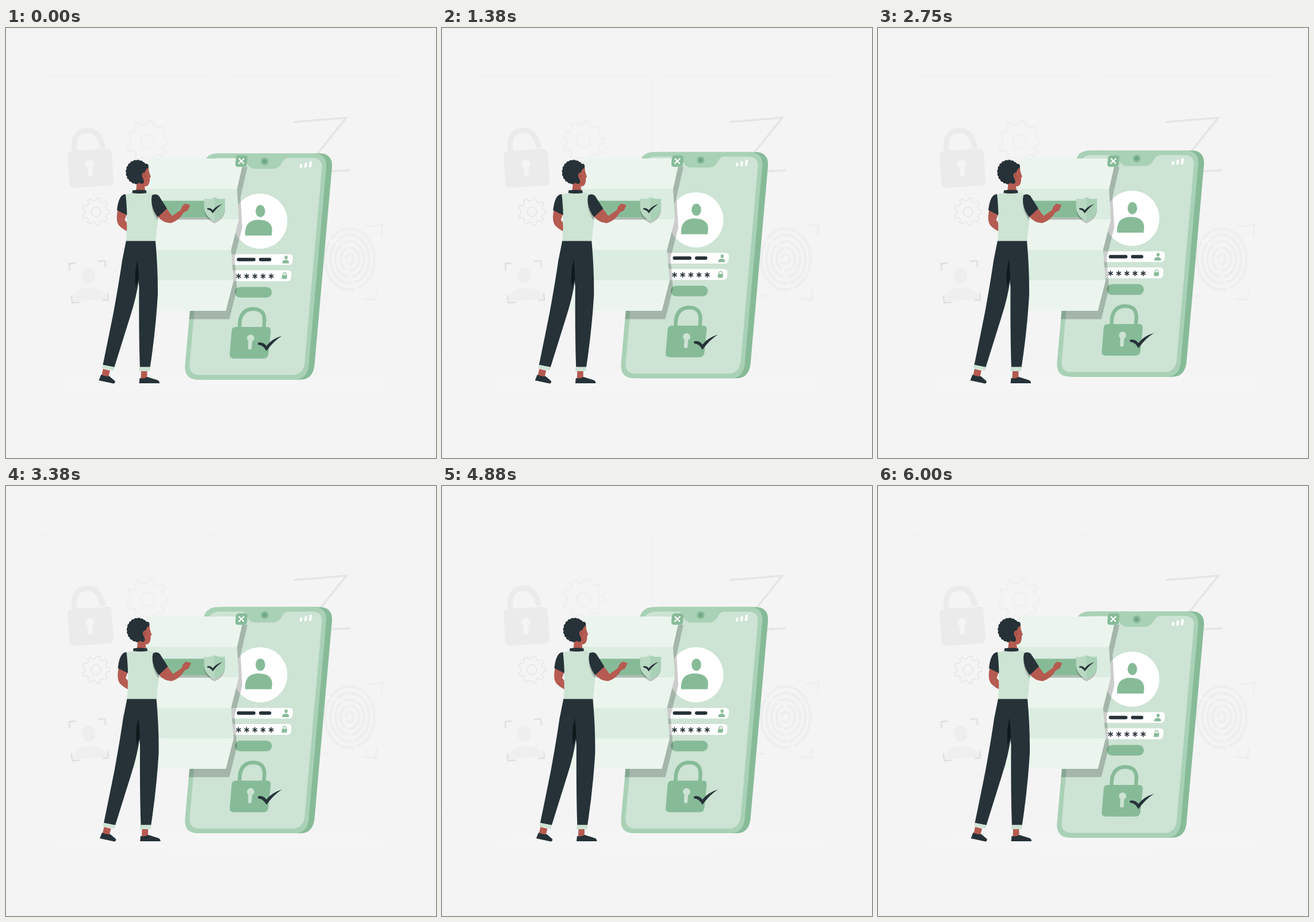
Write an HTML page that moves like this. It is 748 px wide and 748 px high and loops after 6.04 s.

```html
<!DOCTYPE html>
<html lang="en">
<head>
<meta charset="utf-8">
<title>Secure login</title>
<style>
  html, body { margin: 0; width: 100%; height: 100%; overflow: hidden; background: #f4f4f4; }
  svg { display: block; width: 100%; height: 100%; }
  .mid { fill: #87bb98; }
  .body { fill: #a9d1b6; }
  .pale { fill: #cde3d4; }
  .dark { fill: #263238; }
  .skin { fill: #b55b51; }
  .white { fill: #fff; }
  .shade { fill: #000; opacity: .2; }
  .line { fill: none; stroke-linecap: round; stroke-linejoin: round; }
</style>
</head>
<body>
<svg viewBox="0 0 748 748">
  <defs>
    <path id="front" d="M368 218H534Q559 218 557 243L526.500 588Q523 611.700 502 611.700H334Q309.500 611.700 311.500 586L342 244Q345 218 368 218Z"/>
    <path id="shield" d="M344.500 297Q355 298.500 362.700 294.500Q370 298.500 381 297V313Q380 328 362.700 336Q346 328 344.500 313Z"/>
    <path id="tick" d="M438 547.500Q447 545 453 553Q462 541 480 535.500Q465 545 453 562Q447 551 438.500 551Z"/>
    <clipPath id="onPhone"><use href="#front"/></clipPath>
    <clipPath id="rightHalf"><rect x="362.700" y="290" width="22" height="50"/></clipPath>
  </defs>

  <g id="backdrop">
    <g fill="none" stroke="#f0f0f0">
      <rect x="60" y="84" width="305" height="421"/>
      <rect x="383" y="84" width="306" height="421"/>
      <path d="M0 572H748" stroke="#f2f2f2"/>
    </g>
    <ellipse cx="375" cy="619" rx="290" ry="17" fill="#f5f5f5"/>
    <path class="line" d="M119 213Q115 178 142 178Q160 177 168 205" stroke="#ebebeb" stroke-width="9.500"/>
    <rect x="108.500" y="212" width="77" height="64" rx="8" fill="#ebebeb" transform="rotate(-3.700 147 244)"/>
    <path class="line" d="M146 239L146.500 255" stroke="#f4f4f4" stroke-width="8"/>
    <circle cx="146" cy="237" r="7.800" fill="#f4f4f4"/>
    <g id="gears" fill="none"></g>
    <path d="M111 422L110 410L121 409M160 406L172 405L173 416M114 465L115 478L128 477M167 474L178 473L177 461" fill="none" stroke="#dfdfdf" stroke-width="2.500"/>
    <ellipse cx="143.500" cy="431" rx="11.500" ry="14" fill="#eee"/>
    <path d="M116 475Q117 453 144 452Q174 452 176 472Z" fill="#efefef"/>
    <path d="M501 163.500L592 156L515 252L598 247.500" fill="none" stroke="#e5e5e5" stroke-width="3.500"/>
    <g id="fingerprint" class="line" stroke="#eee" stroke-width="4.500"></g>
    <path d="M633 345L655 342L653 362M621 471L643 473L645 455M552 466H562" fill="none" stroke="#eee" stroke-width="3"/>
  </g>

  <g id="phone">
    <use href="#front" x="10" class="mid"/>
    <path class="mid" d="M500 218H545V612H500Z" clip-path="url(#onPhone)"/>
    <use href="#front" class="body"/>
    <path class="pale" d="M372 226H412Q418 228 420 236Q424 245 434 245H463Q474 245 479 236Q484 226 490 226H532Q551 226 549.500 244L519.500 583Q517 603.500 498 603.500H336Q318 603.500 319.500 584L350 246Q352 226 372 226Z"/>
    <circle class="mid" cx="450" cy="232" r="6.700"/>
    <circle cx="450" cy="232" r="3.500" fill="#72a585"/>
    <rect class="white" x="364" y="236.500" width="14" height="5" opacity=".8"/>
    <g class="line" stroke="#fff" stroke-width="4.200">
      <path d="M513 241.500L513.500 238.500M521 241L521.700 236M529 240.500L530 233.500"/>
    </g>
    <ellipse class="white" cx="442" cy="336" rx="47.500" ry="48"/>
    <g class="mid">
      <ellipse cx="442.500" cy="318.500" rx="8.300" ry="10.700"/>
      <path d="M416 361Q414 334 439 333.500Q463 334 463 352L462 361Z"/>
    </g>
    <path class="white" d="M380 393.500H493Q499.500 393.500 499 400L498.500 406Q498 412 492 412H380Z"/>
    <path class="white" d="M380 421.500H490.500Q497 421.500 496.500 428L496 434Q495.500 440.500 489 440.500H380Z"/>
    <rect class="dark" x="401.500" y="399.700" width="32.500" height="6" rx="3"/>
    <rect class="dark" x="440" y="399.700" width="21.500" height="6" rx="3"/>
    <g class="mid">
      <ellipse cx="487.200" cy="399.300" rx="2.600" ry="3.200"/>
      <path d="M480.500 409.500Q480 403.500 486.500 403.500Q493 403.500 492.300 409.500Z"/>
      <path d="M480.500 430H489L488.300 436.500H479.500Z"/>
      <path class="line" d="M481.800 430.500Q481.500 425.500 484.700 425.500Q488 425.500 487.500 430.500" stroke="#87bb98" stroke-width="1.300" style="fill:none"/>
      <rect x="398" y="450.500" width="64.500" height="18.600" rx="9.300"/>
    </g>
    <g id="stars" class="line" stroke="#263238" stroke-width="1.700"></g>
    <path d="M406 523L407 509Q411 488.700 430 488.700Q450 488.700 449.500 509L448.500 523" fill="none" stroke="#87bb98" stroke-width="6.500"/>
    <path class="mid" d="M400 520H454Q461 520 460.500 527L456.500 567Q455.500 575 447.500 575H397Q388.700 575 389.200 568L392.500 527Q393 520 400 520Z"/>
    <circle class="pale" cx="425.500" cy="539.500" r="6.300"/>
    <path class="line" d="M425 541L424.200 556" stroke="#cde3d4" stroke-width="6.500"/>
    <use href="#tick" class="dark"/>
    <g clip-path="url(#onPhone)">
      <path id="paperShade" class="shade" d="M300 241.500H420L408 294L411 347L397.500 400L402 453L388.500 506.500H300Z"/>
    </g>
  </g>

  <g id="paper"></g>
  <rect class="shade" x="267" y="305" width="90" height="28.500" rx="4"/>
  <rect class="mid" x="267" y="300.500" width="90" height="28.500" rx="4"/>
  <use href="#shield" class="shade" y="4"/>
  <use href="#shield" fill="#b9d9c3"/>
  <use href="#shield" class="body" clip-path="url(#rightHalf)"/>
  <use href="#tick" class="dark" transform="translate(350 313.500) scale(.64 .62) translate(-438 -547.500)"/>
  <path class="mid" d="M405.500 221.500H415Q420.500 221.500 420 227L419.300 236Q418.800 241.500 413.500 241.500H404Q398.600 241.500 399 236L399.800 227Q400.200 221.500 405.500 221.500Z"/>
  <path class="line" d="M405.500 227.500L413.200 235.500M413.700 227.500L405 235.500" stroke="#fff" stroke-width="2.300"/>

  <g id="person">
    <path class="skin" d="M169 593L181 596L178 608L166 606ZM235 596H245.500V611H234.500Z"/>
    <path class="dark" d="M165.500 603Q174 607 179.500 605.500L189.500 614Q190.500 618 187 618.500L161.500 613ZM232.500 609Q240 610.500 246 607L262 612Q267.500 613.500 267 618H231.700Z"/>
    <path class="dark" d="M209 370H240L231 438Q227 468 216 502L188.500 590L168.500 586Q177 545 187 495Q197 440 202 405Z"/>
    <path class="dark" d="M222 370H260Q264.500 420 264 465Q260 530 250.500 591H233Q231 540 231.500 450Z"/>
    <path d="M229 403Q222.500 425 225.500 452Q228 442 231.300 437Z" fill="#10181b"/>
    <path class="pale" d="M168.500 586L188.500 590L187 596L167 592ZM232 589.500H251L250 597H231.500Z"/>
    <path class="skin" d="M194.500 316Q190 336 197 344Q203 350 212 354.500L210 338L206.500 334L210 324Z"/>
    <path class="skin" d="M236 238L248 242Q248.500 251 250 254L252 258.500L250 261Q250.500 272 245 275Q242 276 241 275L242.500 285H226L228 266Z"/>
    <path class="pale" d="M206 290Q222 285 232 287Q247 285 257 288L264.500 331Q262 350 260.500 370.500H209Q211.500 345 209.500 320Z"/>
    <path class="dark" d="M220 282.500Q232 280.500 244 282.500L244.500 287Q232 289 219.500 287ZM208 289Q196 289 193 317L210.500 325.500Q210 305 208 289Z"/>
    <path class="shade" d="M253.500 299Q251 316 263 334L266 329Z"/>
    <path class="skin" d="M263 326Q274 341 288 339Q302 334 309 321L316 317.500L320.500 308Q316 306.500 312 305.500Q306 308 304 316.500L289 327L278 312Z"/>
    <path class="dark" d="M254 291Q261 287 266 292L280 314L264 329Q253 315 253 298Z"/>
    <g id="hair" class="dark">
      <path d="M213 244Q220 233 240 233L245 244Q242 249 240 254L238 268Q230 272 221 267Q210 257 213 244Z"/>
    </g>
    <ellipse class="skin" cx="240.300" cy="257" rx="3.700" ry="5.500" transform="rotate(-8 240 257)"/>
    <path class="line" d="M239 254.500Q242 255.500 241 259.500M248 253L249.500 252.500" stroke="#7c3b36" stroke-width=".8"/>
  </g>
</svg>

<script>
const LOOP = 6040, UNIT = 748 / 500;
const byId = id => document.getElementById(id);

function add(parent, tag, attrs) {
  const el = document.createElementNS('http://www.w3.org/2000/svg', tag);
  for (const key in attrs) el.setAttribute(key, attrs[key]);
  byId(parent).appendChild(el);
}

function gear(cx, cy, outer, hub, color, width) {
  const teeth = 9, points = [];
  for (let i = 0; i < teeth; i++) {
    for (const [turn, size] of [[-.3, .8], [-.18, 1], [.18, 1], [.3, .8]]) {
      const a = (i + turn) / teeth * 2 * Math.PI;
      points.push([cx + outer * size * Math.cos(a), cy + outer * size * Math.sin(a)]);
    }
  }
  const style = { stroke: color, 'stroke-width': width, 'stroke-linejoin': 'round' };
  add('gears', 'path', { d: 'M' + points.join('L') + 'Z', ...style });
  add('gears', 'circle', { cx, cy, r: hub, ...style });
}
gear(246, 197, 36, 12, '#eee', 2);
gear(156.5, 319.5, 24, 8.5, '#e6e6e6', 1.6);

for (let i = 0; i < 5; i++) {
  const rx = 7 + i * 9, ry = 9 + i * 11;
  add('fingerprint', 'ellipse', {
    cx: 598, cy: 402, rx, ry, 'stroke-dasharray': `${rx * 2.6} 9`, 'stroke-dashoffset': i * 13
  });
}

for (let i = 0; i < 5; i++) {
  const x = 404.5 + i * 14.2, y = 431.8;
  for (let k = 0; k < 3; k++) {
    const a = k * Math.PI / 3 + .5, dx = 4 * Math.cos(a), dy = 4 * Math.sin(a);
    add('stars', 'path', { d: `M${x - dx} ${y - dy}L${x + dx} ${y + dy}` });
  }
}

// Folded paper: five bands between zigzag edges
const edge = [414, 402, 405, 391.5, 396, 382.5], paperWidth = 167;
for (let i = 0; i < 5; i++) {
  const top = 227 + i * 53, bottom = top + 53, a = edge[i], b = edge[i + 1];
  add('paper', 'path', {
    d: `M${a - paperWidth} ${top}H${a}L${b} ${bottom}H${b - paperWidth}Z`,
    fill: i % 2 ? '#dbece1' : '#ebf5ee'
  });
}

// Curls around the back and top of the head
for (let i = 0; i < 13; i++) {
  const a = (95 + i * 18) * Math.PI / 180;
  add('hair', 'circle', { cx: 228 + 16 * Math.cos(a), cy: 250.5 + 17.5 * Math.sin(a), r: 3.8 });
}
add('hair', 'circle', { cx: 243.5, cy: 240.5, r: 4.5 });
add('hair', 'circle', { cx: 236, cy: 267, r: 4 });

// Sideways sway in tenths of a six second cycle
const sway = [0, -1, 2, -4, 4, -4, 4, -4, 2, -1, 0];
function swayAt(t) {
  const pos = (t % 6000) / 600, i = Math.floor(pos);
  return UNIT * (sway[i] + (sway[i + 1] - sway[i]) * (pos - i));
}

function floatAt(t) {
  const phase = (t % 1500) / 1500;
  return -10 * UNIT * (1 - Math.abs(1 - 2 * phase));
}

function draw(t) {
  const dy = floatAt(t);
  byId('phone').setAttribute('transform', `translate(0 ${dy})`);
  byId('paperShade').setAttribute('transform', `translate(0 ${-dy})`);
  byId('person').setAttribute('transform', `translate(${swayAt(t)} 0)`);
}

const start = performance.now();
function tick() {
  draw((performance.now() - start) % LOOP);
  requestAnimationFrame(tick);
}
tick();
</script>
</body>
</html>
```
